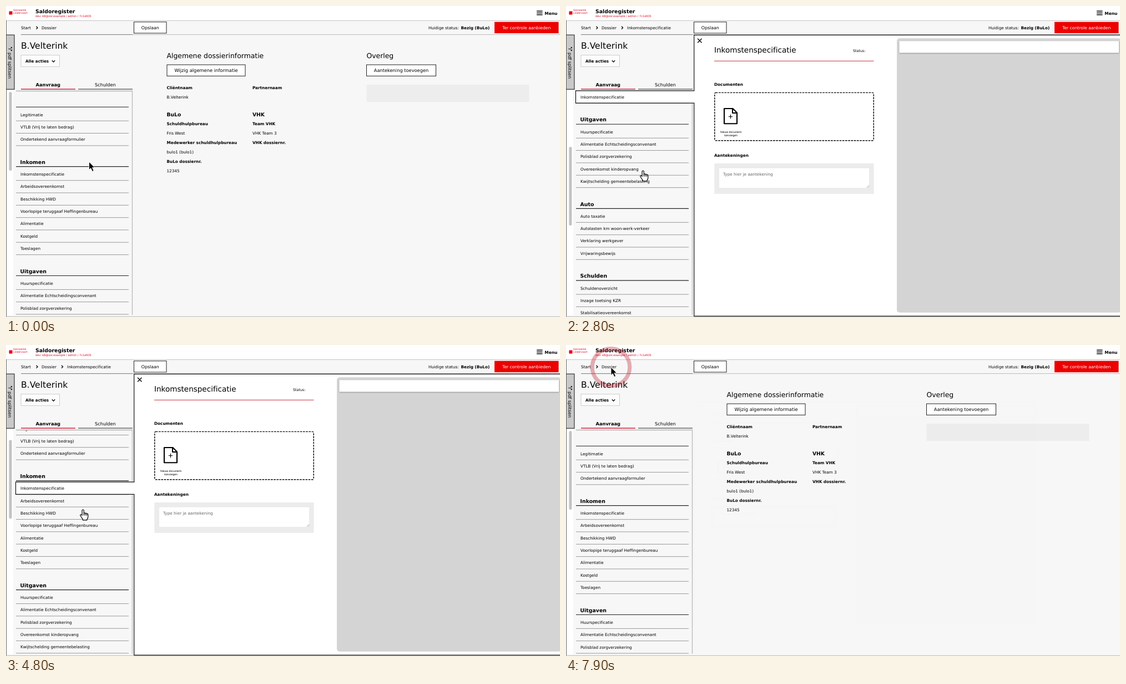
An HTML page that plays this animation: 998 by 561 pixels, repeating every 8 s.

```html
<!DOCTYPE html>
<html lang="nl">
<head>
<meta charset="utf-8">
<title>Dossier</title>
<style>
html, body { margin: 0; width: 100%; height: 100%; overflow: hidden; background: #f7f7f7 }
svg { display: block; width: 100vw; height: 100vh }
text { font-family: "DejaVu Sans", Verdana, sans-serif; font-variant-ligatures: none; text-rendering: geometricPrecision }
.b { font-weight: bold }
.mid { text-anchor: middle }
.red { fill: #e2001a }
.white { fill: #fff }
.grey { fill: #666 }
.small { font-family: "Liberation Sans", Arial, sans-serif; text-anchor: middle }
</style>
</head>
<body>
<svg id="stage" viewBox="0 0 998 561"></svg>
<script>
const LOOP = 8000;
const ITEM = 'Inkomstenspecificatie';
const OPEN = 880, CLOSE = 7480, CLICKS = [850, 7480];
const PITCH = 22.33;

const sections = [
  ['', 'Legitimatie', 'VTLB (Vrij te laten bedrag)', 'Ondertekend aanvraagformulier'],
  ['Inkomen', ITEM, 'Arbeidsovereenkomst', 'Beschikking HWD', 'Voorlopige teruggaaf Heffingenbureau',
    'Alimentatie', 'Kostgeld', 'Toeslagen'],
  ['Uitgaven', 'Huurspecificatie', 'Alimentatie Echtscheidingsconvenant', 'Polisblad zorgverzekering',
    'Overeenkomst kinderopvang', 'Kwijtschelding gemeentebelasting'],
  ['Auto', 'Auto taxatie', 'Autolasten km woon-werk-verkeer', 'Verklaring werkgever', 'Vrijwaringsbewijs'],
  ['Schulden', 'Schuldenoverzicht', 'Inzage toetsing KZR', 'Stabilisatieovereenkomst', 'Schuldbewijzen', 'Crediteurenlijst']
];

// Drawing helpers; text is placed by its vertical middle.
const text = (x, y, s, size = 7.25, cls = '') =>
  `<text x="${x}" y="${y + size * .365}" font-size="${size}" class="${cls}">${s}</text>`;
const rect = (x, y, x2, y2, fill, more = '') =>
  `<rect x="${x}" y="${y}" width="${x2 - x}" height="${y2 - y}" fill="${fill}" ${more}/>`;
const path = (d, stroke = '#000', w = 1, more = '') =>
  `<path d="${d}" fill="none" stroke="${stroke}" stroke-width="${w}" ${more}/>`;
const button = (x, y, x2, y2, label, size) =>
  rect(x, y, x2, y2, '#fff', 'stroke="#222"') + text((x + x2) / 2, (y + y2) / 2, label, size, 'mid');
const chevron = (x, y) => path(`M${x} ${y - 2.5}l2.5 2.5-2.5 2.5`, '#000', 1.3);

const rowY = {};
function list() {
  let y = 174, out = '';
  for (const [title, ...rows] of sections) {
    out += text(25.5, y, title, 9.4, 'b') + path(`M18 ${y + 8.2}H221`, '#222', 1.1);
    y += 22;
    for (const row of rows) {
      rowY[row] = y;
      out += text(26, y, row) + path(`M18 ${y + 11.2}H221`, '#999');
      y += PITCH;
    }
    y += 40.8 - PITCH;
  }
  return out;
}

const header = () =>
  rect(0, 0, 998, 26, '#fff') + path('M0 26.3H998', '#c4c4c4') +
  rect(5.5, 9.5, 11.5, 15.5, '#e2001a') +
  text(13, 7.8, 'Gemeente', 4.5, 'red') + text(13, 12.8, 'Lindervoort', 4.5, 'red') +
  text(53, 10, 'Saldoregister', 9.4, 'b') +
  text(53, 18.3, 'dev: k8@zor.example / admin / 7c1e935', 5, 'red') +
  path('M956 9.3h10.5m-10.5 3.2h10.5m-10.5 3.2h10.5', '#000', 1.5) + text(970.3, 13, 'Menu', 7.4, 'b') +
  path('M27 51.6H228', '#777') + path('M228 51.6H998', '#bbb') +
  text(27, 39.2, 'Start', 7.35) + chevron(54.5, 39.2) + text(64, 39.2, 'Dossier') +
  `<g id="crumb">${chevron(100, 39.2)}${text(110, 39.2, ITEM)}</g>` +
  path('M64 44H91', '#000', .8, 'id="underline"') +
  button(230.5, 28.8, 289, 49, 'Opslaan', 7.85) +
  text(761, 39.2, 'Huidige status:') + text(819.5, 39.2, 'Bezig (BuLo)', 7.25, 'b') +
  rect(880, 28.7, 995.5, 49.2, '#ec0000') + text(937.7, 39, 'Ter controle aanbieden', 7.64, 'mid white');

const sidebar = () =>
  rect(1, 151, 13, 558, '#fff') +
  rect(-1, 52.2, 15, 150.3, '#c9c9c9', 'stroke="#333" stroke-width="1.2"') +
  path('M4.5 77.5h3l3-3m-3 3l3 3m-1.8-6h1.8v1.8m0 2.4v1.8h-1.8', '#000', .9) +
  `<g transform="translate(7 84) rotate(90)">${text(0, -.2, 'pdf splitsen', 8.1)}</g>` +
  text(27, 71, 'B.Velterink', 15.6) +
  rect(27, 88.7, 96.5, 109.3, '#fcfcfc', 'stroke="#ccc"') + text(35, 99, 'Alle acties', 7.2, 'b') +
  path('M82.8 98.3l2.7 2.7 2.7-2.7', '#000', 1.3) +
  text(53.5, 142.3, 'Aanvraag', 8.3, 'b') + path('M27 150H125', '#d0213a', 1.3) +
  text(160, 142.3, 'Schulden', 8.2) + path('M130 150H228', '#222', 1.2) +
  `<g clip-path="url(#view)"><g id="list"><g id="hover">${rect(18, -12, 221, 11, '#d6d6d6')}${path('M18-12H221', '#333')}</g>${list()}</g></g>` +
  path('M18 153.3H228', '#bdbdbd', 1.8) + path('M227.5 153V557', '#bdbdbd', 1.4) +
  rect(5.5, 155, 10.5, 297, '#c2c2c2', 'rx="2.5" id="thumb"');

const info = () =>
  text(289.5, 89.8, 'Algemene dossierinformatie', 12.4) +
  button(290, 106, 431, 126.3, 'Wijzig algemene informatie', 8.33) +
  [[147.3, 'Cliëntnaam', 'Partnernaam'], [212, 'Schuldhulpbureau', 'Team VHK'],
   [246.3, 'Medewerker schuldhulpbureau', 'VHK dossiernr.'], [280.6, 'BuLo dossiernr.', '']]
    .map(([y, a, b]) => text(289.5, y, a, 7.25, 'b') + text(444, y, b, 7.25, 'b')).join('') +
  text(289.5, 196, 'BuLo', 9.2, 'b') + text(444, 196, 'VHK', 9.2, 'b') +
  text(289.5, 164.3, 'B.Velterink') + text(289.5, 229.3, 'Fris West') + text(444, 229.3, 'VHK Team 3') +
  text(289.5, 263.5, 'bulo1 (bulo1)') + text(289.5, 297.7, '12345') +
  text(649.5, 89.8, 'Overleg', 12.4) +
  button(649.5, 106, 774.5, 126.3, 'Aantekening toevoegen', 8.28) +
  rect(649.5, 142, 942.5, 173, '#ededed');

const panel = () =>
  rect(230.7, 52.4, 1004, 559.4, '#fff', 'stroke="#111" stroke-width="1.2"') +
  path('M237 58.8l7.5 7.5m0-7.5l-7.5 7.5', '#000', 1.4) +
  text(267, 79.4, ITEM, 13.55) + text(517, 80.3, 'Status:', 6.4) +
  path('M267 99.3H554.5', '#c9303f', 1.1) +
  text(267, 141.2, 'Documenten', 7.3, 'b') +
  rect(267.8, 156.4, 554.2, 242.8, 'none', 'rx="2" stroke="#000" stroke-width="1.4" stroke-dasharray="3.6 1.6"') +
  path('M285 185h15.5l7.5 7.5v19.7h-23zM300 185v8h8', '#000', 2.1, 'stroke-linejoin="round"') +
  path('M296.5 195.8v7.4m-3.7-3.7h7.4', '#000', 1.2) +
  text(297, 227.3, 'Nieuw document', 5.1, 'small') + text(297, 233.5, 'toevoegen', 5.1, 'small') +
  text(267, 269.2, 'Aantekeningen', 7.27, 'b') +
  rect(267.3, 284, 554.5, 339, '#ececec') +
  rect(275.3, 292, 546.8, 328.8, '#fff', 'stroke="#e0e0e0" stroke-width=".7"') +
  text(283, 303.5, 'Type hier je aantekening', 7.3, 'grey') +
  path('M542 327.5l4-4m-1.7 4l1.7-1.7', '#777', .7) +
  rect(596, 58.3, 1000, 553, '#d4d4d4', 'rx="5"') +
  rect(600.5, 63.3, 996, 84.3, '#fff', 'filter="url(#shade)"');

const activeRow = () =>
  rect(17.5, -11.5, 232.5, 10.8, '#fff') + path('M231.3-11.5H17.5V10.8H231.3', '#111', 1.2) + text(26, 0, ITEM);

const outline = 'fill="#000" stroke="#fff" stroke-width=".9" stroke-linejoin="round"';
const arrow = `<path id="arrow" d="M0 0V14.5L3.3 11.5 6 17.5 8.6 16.3 6 10.5H10.4Z" ${outline}/>`;
const hand = `<path id="hand" transform="translate(.9 .4)" d="M-1.8 1.2a1.6 1.6 0 0 1 3.2 0V6q1.5-1.2 2.6.4 1.6-1 2.6.6 2-.7 2.3 1.4V12q0 3-2 5.2V18.5H-.5V17Q-3 13.5-5.2 9.8-5 7.6-2.6 8.8L-1.8 10ZM1.4 6v4M4 6.4v3.6M6.6 7v3.3" fill="#fff" stroke="#000" stroke-width="1.2" stroke-linejoin="round"/>`;

document.getElementById('stage').innerHTML =
  `<defs><clipPath id="view">${rect(14, 153, 228, 557, '#000')}</clipPath>
  <filter id="shade" x="-5%" y="-30%" width="110%" height="180%"><feDropShadow dx="0" dy="1" stdDeviation="1.2" flood-opacity=".4"/></filter></defs>` +
  rect(0, 0, 998, 561, '#f7f7f7') + header() + sidebar() + info() +
  path('M.4 26V561', '#444', .9) + path('M0 560.3H998', '#bbb') +
  `<g id="panel">${panel()}</g><g id="active">${activeRow()}</g>` +
  `<circle id="ring" fill="none" stroke="#bb2433"/><g id="cursor">${arrow}${hand}</g>`;

const el = id => document.getElementById(id);
const clamp = v => Math.min(1, Math.max(0, v));
const show = (id, on) => el(id).setAttribute('visibility', on ? 'visible' : 'hidden');
const move = (id, x, y) => el(id).setAttribute('transform', `translate(${x} ${y})`);
const easeOut = (p, n) => 1 - (1 - clamp(p)) ** n;

// Linear interpolation through [time, value] points.
function track(points, t) {
  let [t0, v0] = points[0];
  for (const [t1, v1] of points) {
    if (t < t1) return t <= t0 ? v0 : v0 + (v1 - v0) * (t - t0) / (t1 - t0);
    [t0, v0] = [t1, v1];
  }
  return v0;
}
const cursorX = [[50, 149.5], [400, 138], [5750, 138], [6400, 81]];
const cursorY = [[50, 281], [400, 297], [5750, 297], [6400, 40]];
const scrollKeys = [[1550, 0], [1900, 33], [2300, 134], [2800, 273], [3100, 332], [3300, 349],
  [3620, 349], [4100, 232.5], [4800, 45], [5000, 12], [5200, 0]];

function draw(t) {
  const scroll = track(scrollKeys, t);
  move('list', 0, -scroll);
  move('thumb', 0, scroll * .3625);

  const hovered = t < OPEN ? ITEM : 'Auto taxatie';
  move('hover', 0, rowY[hovered]);
  show('hover', (t >= 300 && t < OPEN) || (t >= 3400 && t < 5200));

  const isOpen = t >= OPEN && t < CLOSE;
  show('active', isOpen);
  move('active', 0, Math.max(164.4, rowY[ITEM] - scroll));
  show('crumb', t >= 1600 && t < CLOSE);
  show('underline', t >= 6400 && t < CLOSE);

  const grow = easeOut((t - OPEN) / 500, 3) - easeOut((t - CLOSE) / 500, 3);
  const k = .8 + .2 * grow;
  el('panel').setAttribute('transform', `translate(231 306) scale(${k}) translate(-231 -306)`);
  el('panel').setAttribute('opacity', grow);

  const x = track(cursorX, t), y = track(cursorY, t);
  move('cursor', x, y);
  const pointing = (t >= 700 && t < 5800) || (t >= 6700 && t < 7500);
  show('hand', pointing);
  show('arrow', !pointing);

  const start = CLICKS.find(c => t >= c && t < c + 600);
  show('ring', start !== undefined);
  if (start !== undefined) {
    const p = (t - start) / 600, r = 41 * easeOut(p, 2), w = r * .19;
    const ring = { cx: x, cy: y, r: r - w / 2, 'stroke-width': w, opacity: Math.min(.6, 1.2 * (1 - p)) };
    for (const key in ring) el('ring').setAttribute(key, ring[key]);
  }
}

const begin = performance.now();
function tick() {
  draw((performance.now() - begin) % LOOP);
  requestAnimationFrame(tick);
}
tick();
</script>
</body>
</html>
```
